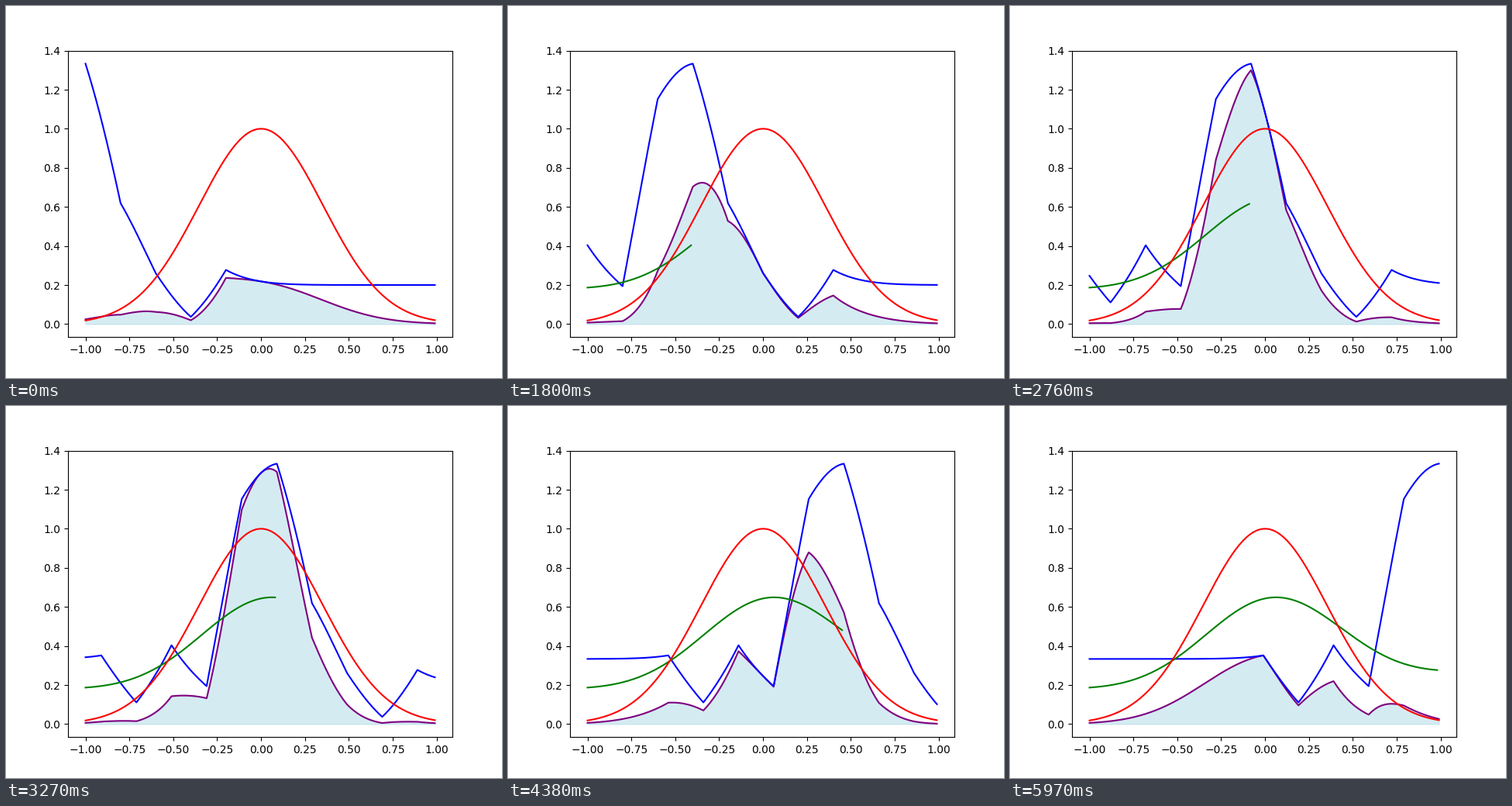
These frames come from a looping animation (640 px wide and 480 px high, 6 s). A matplotlib script:

```python
import numpy as np
import matplotlib.pyplot as plt
from matplotlib.animation import FuncAnimation

STEP = 0.01
FRAMES = 200
x = -1 + STEP * np.arange(FRAMES)

# Piecewise linear disturbance added to the sliding bell curve
knots = -1 + 0.2 * np.arange(10)
noise = np.array([10, 1, 5, -10, 9, 10, -7, -8, -6, 6]) / 30


def bell(u):
    return np.exp(-4 * u**2)


def signal(u):
    return bell(u) + np.interp(u, knots, noise)


kernel = bell(x)
overlap = np.array([np.sum(kernel * signal(x - t)) * STEP for t in x])

fig, ax = plt.subplots(figsize=(6.4, 4.8), dpi=100)
ax.set_xlim(-1.0995, 1.0895)
ax.set_ylim(-1 / 15, 1.4)

area = ax.fill_between(x, kernel, color="lightblue", alpha=0.5)
product_line, = ax.plot([], [], color="purple")
signal_line, = ax.plot([], [], color="blue")
overlap_line, = ax.plot([], [], color="green")
ax.plot(x, kernel, color="red")


def update(i):
    shifted = signal(x - x[i])
    product = kernel * shifted
    signal_line.set_data(x, shifted)
    product_line.set_data(x, product)
    overlap_line.set_data(x[:i], overlap[:i])
    top = np.column_stack([x, product])
    area.set_verts([np.vstack([[x[0], 0], top, [x[-1], 0]])])
    return area, product_line, signal_line, overlap_line


anim = FuncAnimation(fig, update, frames=FRAMES, interval=30,
                     repeat=True, repeat_delay=0, blit=False)
plt.show()
```
